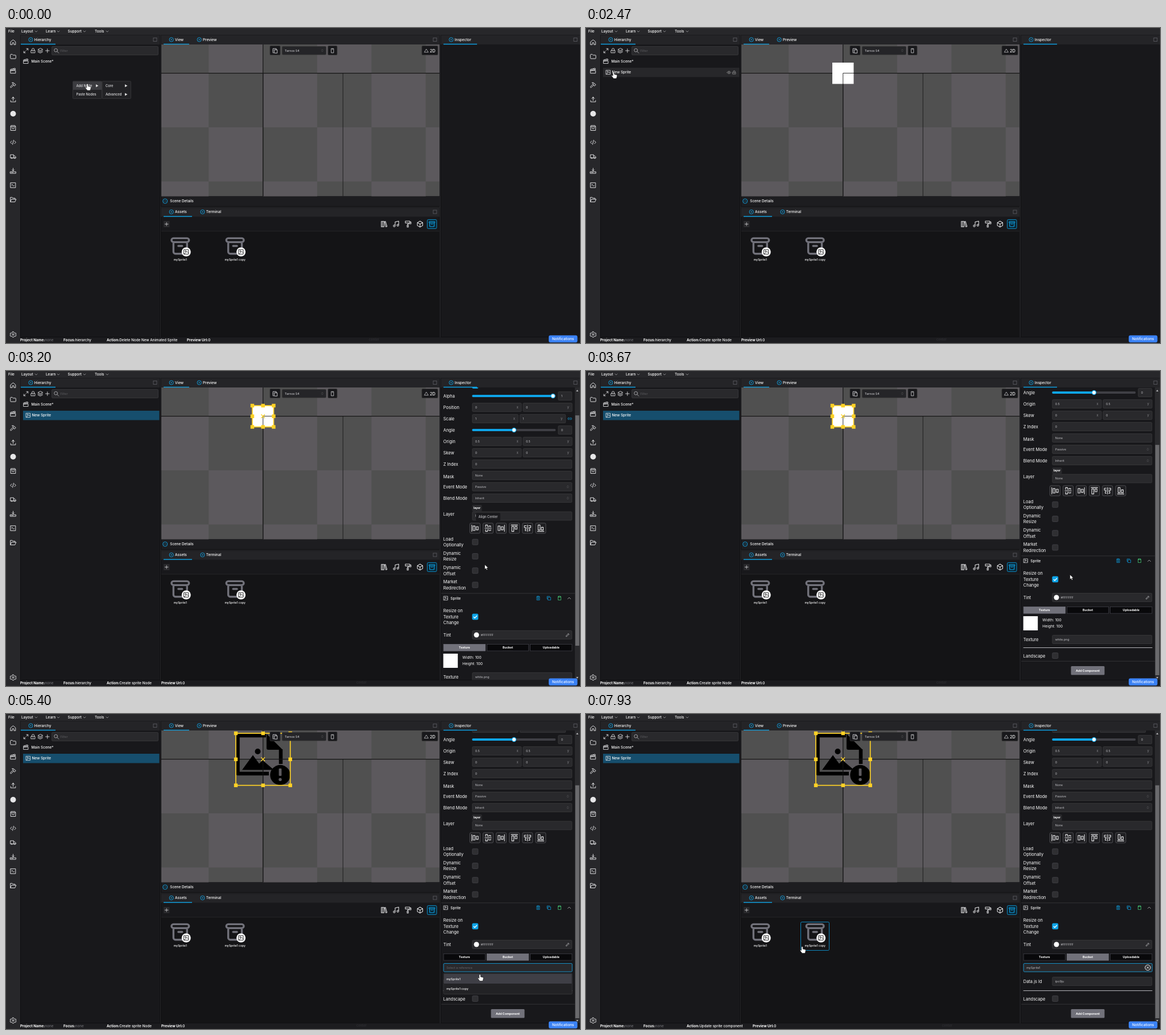
Recreate the animation shown at these times as an HTML page. Size 1009 by 555 pixels, loop 8 s.

```html
<!DOCTYPE html>
<html lang="en">
<head>
<meta charset="utf-8">
<title>Scene editor</title>
<style>
html, body { margin: 0; width: 100%; height: 100%; overflow: hidden; background: #27272a; }
svg { display: block; width: 1009px; height: 555px; }
text { font-family: Inter, "Open Sans", sans-serif; font-weight: 500; white-space: pre; }
.light { font-weight: 400; }
.bold { font-weight: 700; }
</style>
</head>
<body>
<svg id="stage" viewBox="0 0 1009 555" xmlns="http://www.w3.org/2000/svg"></svg>
<script>
const BLUE = '#0ea5e9', DIM = '#6b6b70', SOFT = '#c2c2c6', YELLOW = '#fdd126';
const PANEL = '#18181b', BAR = '#27272a', FIELD = '#29292c', EDGE = '#3a3a3d';

const ICONS = {
  home: 'M3 10.500 12 3l9 7.500V21h-6v-7H9v7H3z',
  folder: 'M2 6a2 2 0 0 1 2-2h5l3 3h8a2 2 0 0 1 2 2v9a2 2 0 0 1-2 2H4a2 2 0 0 1-2-2z',
  clap: 'M3 11h18v10H3zM3 11 2 7 19 2.500l1.500 4zM7 6l4 4M13 4.500l4 3.500',
  hammer: 'm14 12-8.500 8.500a2 2 0 0 1-3-3L11 9M17.500 15 22 10.500 13 3H8l5 5v2z',
  upload: 'M3 16v5h18v-5M7 9l5-6 5 6M12 3v13',
  bag: 'M5 3h14l2 4v14H3V7zM3 7h18M16 11a4 4 0 0 1-8 0',
  code: 'M7 7l-5 5 5 5M17 7l5 5-5 5M14 4l-4 16',
  truck: 'M5 17H2V5h12v12H9M14 9h4l4 4v4h-2M16 17h-2M9 17a2 2 0 1 1-4 0a2 2 0 1 1 4 0M20 17a2 2 0 1 1-4 0a2 2 0 1 1 4 0',
  tray: 'M12 2v10M8 8l4 4 4-4M2 15h20v6H2zM6 18h1M10 18h1',
  term: 'M3 3h18v18H3zM7 8l3 2.500-3 2.500M12 14h4',
  open: 'M2 20 6 11h17l-4 9zM2 20V4h7l2 3h8v4',
  gear: 'M15 12a3 3 0 1 1-6 0a3 3 0 1 1 6 0M10 2h4l1 3 3 2 3-1 2 4-2 2 2 3-2 4-3-1-3 2-1 2h-4l-1-2-3-2-3 1-2-4 2-3-2-2 2-4 3 1 3-2z',
  expand: 'M14 3h7v7M21 3l-7 7M10 21H3v-7M3 21l7-7',
  lock: 'M4 11h16v10H4zM7 11V7a5 5 0 0 1 10 0v4M12 15v2',
  layers: 'M12 2 2 7l10 5 10-5zM2 12l10 5 10-5M2 17l10 5 10-5',
  plus: 'M12 4v16M4 12h16',
  find: 'M17 10a7 7 0 1 1-14 0a7 7 0 1 1 14 0M15 15l7 7',
  picture: 'M3 3h18v18H3zM11 9a2 2 0 1 1-4 0a2 2 0 1 1 4 0M4 20 15 10l6 6',
  eye: 'M1 12q11-15 22 0q-11 15-22 0M15 12a3 3 0 1 1-6 0a3 3 0 1 1 6 0',
  rotate: 'M3 12V3h14v5M10 8h11v14H10zM3 12v9h3',
  phone: 'M7 2h10v20H7zM11 5h2',
  tri: 'M12 4 22 20H2z',
  books: 'M3 3h4v18H3zM7 3h5v18H7zM14 4l3-1 5 17-4 1z',
  music: 'M9 18V5l12-3v14M9 18a3 3 0 1 1-6 0a3 3 0 1 1 6 0M21 16a3 3 0 1 1-6 0a3 3 0 1 1 6 0',
  roller: 'M3 2h15v6H3zM18 5h4v6H11v4M9 15h4v7H9z',
  cube: 'M12 2 21 7v10l-9 5-9-5V7zM3 7l9 5 9-5M12 12v10',
  archive: 'M5 4h14a2 2 0 0 1 0 4H5a2 2 0 0 1 0-4M5 8v10a2 2 0 0 0 2 2h10a2 2 0 0 0 2-2V8M10 12h4',
  copy: 'M8 8h13v13H8zM4 16H3V3h13v1',
  paste: 'M8 4H5v17h14V4h-3M8 2h8v5H8z',
  list: 'M8 4H5v17h14V4h-3M8 2h8v5H8zM9 12h6M9 16h6',
  up: 'M4 16l8-8 8 8',
  down: 'M4 8l8 8 8-8',
  sort: 'M7 9l5-5 5 5M7 15l5 5 5-5',
  link: 'M9 7H7a5 5 0 0 0 0 10h2M15 7h2a5 5 0 0 1 0 10h-2M8 12h8',
  dropper: 'M3 21v-4L14 6l4 4L7 21zM15 3l6 6',
  cross: 'M7 7l10 10M17 7 7 17',
  alignLeft: 'M2 2v20M6 5h6v14H6zM16 7h6v10h-6z',
  alignCenter: 'M2 12h20M10 16v6H4v-6M10 8V2H4v6M20 16v3h-6v-3M20 8V5h-6v3',
  alignRight: 'M22 2v20M2 5h6v14H2zM12 7h6v10h-6z',
  alignTop: 'M2 2h20M4 6h6v16H4zM14 6h6v9h-6z',
  alignMiddle: 'M12 2v20M8 10H2V4h6M16 10h6V4h-6M8 20H5v-6h3M16 20h3v-6h-3',
  alignBottom: 'M2 22h20M4 2h6v16H4zM14 9h6v9h-6z'
};

const rect = (x, y, w, h, fill, more = '') =>
  `<rect x="${x}" y="${y}" width="${w}" height="${h}" fill="${fill}" ${more}/>`;
const line = (d, color, w = 1, more = '') =>
  `<path d="${d}" fill="none" stroke="${color}" stroke-width="${w}" ${more}/>`;
const circle = (x, y, r, fill, more = '') => `<circle cx="${x}" cy="${y}" r="${r}" fill="${fill}" ${more}/>`;
const text = (x, y, s, size = 6.4, fill = '#fff', more = '') =>
  `<text x="${x}" y="${y + size * .36}" font-size="${size}" fill="${fill}" ${more}>${s}</text>`;
const icon = (name, x, y, size = 11, color = '#e6e6e8', w = 2) =>
  line(ICONS[name], color, w, `stroke-linejoin="round" stroke-linecap="round" transform="translate(${x - size / 2} ${y - size / 2}) scale(${size / 24})"`);
const group = (id, body) => `<g id="${id}">${body}</g>`;
const MID = 'text-anchor="middle"', BOLD = ' class="bold"';
const box = (x, y, w, h, fill = FIELD, edge = EDGE, r = 1.5) =>
  rect(x + .5, y + .5, w - 1, h - 1, fill, `rx="${r}" stroke="${edge}" stroke-width=".8"`);

function tab(x, y, label, from, to) {
  const under = to ? rect(from, y + 7.3, to - from, 1.4, BLUE) : '';
  return circle(x, y, 3.6, 'none', `stroke="${BLUE}" stroke-width=".9"`) + circle(x, y, 1, BLUE) + text(x + 6.3, y, label) + under;
}
const maximize = (x, y) => rect(x - 3, y - 3, 6, 6, 'none', 'stroke="#5a5a5f" stroke-width=".9"');

function frameParts() {
  let s = rect(0, 0, 1009, 555, BAR);
  [['File', 4], ['Layout', 27, 53], ['Learn', 70, 92], ['Support', 108.5, 138], ['Tools', 156, 178]].forEach(([name, x, arrow]) => {
    s += text(x, 6, name) + (arrow ? icon('down', arrow, 6, 6) : '');
  });
  s += rect(0, 544.5, 1009, 10.5, '#1c1c1f') + rect(0, 535, 25, 20, BAR);
  const side = ['home', 'folder', 'clap', 'hammer', 'upload', '', 'bag', 'code', 'truck', 'tray', 'term', 'open'];
  side.forEach((name, i) => {
    const y = 25 + i * 25.2;
    s += name ? icon(name, 12.5, y, 11.5) : circle(12.5, y, 5, '#e6e6e8');
  });
  s += icon('gear', 12.5, 540, 11.5);
  [[25.5, 13, 245, 531.5], [272.5, 13, 489.5, 301.5], [272.5, 316.5, 489.5, 228], [764.5, 13, 244.5, 531.5]].forEach(([x, y, w, h]) => {
    s += rect(x, y, w, h, PANEL, 'stroke="#0f0f11" stroke-width="1"') + rect(x, y, w, 16, '#242427');
  });
  s += tab(43.5, 20.5, 'Hierarchy', 26, 87) + maximize(262, 20.5);
  s += tab(290.7, 20.5, 'View', 277, 322) + tab(339.7, 20.5, 'Preview') + maximize(754, 20.5);
  s += tab(782.5, 20.5, 'Inspector', 769, 828) + maximize(1001, 20.5);
  s += tab(290.7, 324, 'Assets', 277, 327) + tab(345.5, 324, 'Terminal') + maximize(754, 324);
  return s;
}

function hierarchy() {
  let s = '';
  ['expand', 'lock', 'layers', 'plus'].forEach((name, i) => s += icon(name, 35 + i * 12.6, 40, 10));
  s += box(80, 32, 188, 16) + icon('find', 88.5, 40, 10, '#b8b8bc') + text(95.5, 40, 'Filter', 5.4, '#57575b');
  s += icon('clap', 35, 58.5, 10.5) + text(44.5, 58.5, 'Main Scene*');
  s += group('rowHover', rect(30, 70, 239.5, 16.5, '#27272a') + icon('eye', 251.3, 78.3, 7.5, '#aaa') + icon('lock', 260.5, 78.3, 7.5, '#aaa'));
  s += group('rowPick', rect(30, 70, 239.5, 16.5, '#164e6d'));
  return s + group('node', icon('picture', 39, 78, 9.5) + text(45.5, 78, 'New Sprite'));
}

function handles(x, y, w, h) {
  let s = rect(x, y, w, h, 'none', `stroke="${YELLOW}" stroke-width="1.7"`);
  for (let i = 0; i < 9; i++) if (i !== 4) s += rect(x + (i % 3) * w / 2 - 3.2, y + Math.floor(i / 3) * h / 2 - 3.2, 6.4, 6.4, YELLOW);
  return s + line('M448.500 76.500l6.500 6.500M455 76.500l-6.500 6.500', YELLOW, 1.4);
}

function view() {
  const step = 95.4, hole = '#5c595d';
  let s = rect(273, 29, 489, 267.5, '#505050');
  for (let r = 0; r < 4; r++) for (let c = 0; c < 6; c++) {
    if ((r + c) % 2) s += rect(260.8 + c * step, 79.6 + (r - 1) * step, step, step, hole);
  }
  s += line('M273 79.600H762M451.800 29V297', '#161616', 1.2);
  s += group('white', rect(433, 61, 37.5, 37.5, '#fff'));
  s += group('broken', line('M462 105H407.500V38H457M483 62V88', '#000', 6.5, 'stroke-linejoin="round"')
    + '<path d="M458 35 486.300 63H461q-3 0-3-3zM415 98.500l19-26 11 15 6-6 20 17z"/>'
    + circle(442.5, 66, 5, '#000') + circle(482, 107.5, 17.7, '#000')
    + rect(479.6, 96, 4.8, 13, hole, 'rx="1"') + circle(482, 115.5, 2.7, hole));
  s += line('M451.800 297V79.600H592.300V297', '#1a1a1a', .9);
  s += group('pickSmall', handles(433, 61, 37.5, 37.5)) + group('pickBig', handles(404, 34, 95.7, 91.7));
  s = `<g clip-path="url(#viewClip)">${s}</g>`;
  s += box(463.5, 31, 19, 17, PANEL, '#333') + icon('rotate', 473, 40, 10);
  s += box(485, 32, 78, 15.5, '#252528', '#333') + text(490, 39.7, 'Tarnox S4', 5.3, SOFT) + icon('sort', 556, 39.7, 6, '#777');
  s += box(565.5, 31, 17, 17, PANEL, '#333') + icon('phone', 574, 40, 9);
  s += box(730.5, 31, 29, 17, PANEL, '#333') + icon('tri', 739, 40, 8) + text(745, 40, '2D', 7.3);
  s += rect(273, 297, 489, 17, '#1d1d20') + circle(279.7, 305, 4, 'none', `stroke="${BLUE}" stroke-width=".9"`) + icon('up', 279.7, 304.8, 5, BLUE, 3);
  return s + text(288.3, 305, 'Scene Details', 6.35);
}

const asset = (x, name) => icon('archive', x, 384, 41, '#71717a')
  + circle(x + 10.5, 394.5, 8, '#fff') + icon('picture', x + 10.5, 394.5, 10.5, '#18181b') + text(x, 408.3, name, 5, '#fff', MID);

function assets() {
  let s = rect(273, 358, 489, 186.5, '#141416') + line('M273 358H762', '#2a2a2d', .8);
  s += rect(277, 340, 10.5, 11, '#29292c') + icon('plus', 282.2, 345.5, 8.5);
  ['books', 'music', 'roller', 'cube'].forEach((name, i) => s += icon(name, 664.5 + i * 21.1, 345.5, 12.5));
  s += box(740, 337, 17.5, 17, '#0b2533', BLUE, 2) + icon('archive', 748.7, 345.5, 13.5, BLUE);
  s += group('assetHover', box(377, 366, 51, 51, 'none', BLUE, 2));
  return s + asset(306.3, 'mySprite1') + asset(402.6, 'mySprite1 copy');
}

const label = (y, ...rows) => rows.map((r, i) =>
  text(768.8, y + (i - (rows.length - 1) / 2) * 10.5, r, 7.45, '#fff', 'class="light"')).join('');
const field = (y, value, color = SOFT, x = 819.3, w = 176) => box(x, y - 8, w, 16) + text(x + 5.5, y, value, 5.3, color, 'class="light"');
const select = (y, value) => field(y, value) + icon('sort', 987.5, y, 6, '#77777b');
const check = (y, on) => on
  ? box(819.3, y - 5.5, 11, 11, BLUE, BLUE) + line(`M822 ${y}l2 2.300 4-4.300`, '#fff', 1.3)
  : box(819.3, y - 5.5, 11, 11, '#2f2f32', '#454549');
function pair(y, name, a, w = 87.2) {
  return label(y, name) + [0, 1].map(i => {
    const x = 819.3 + i * (w + 1.9);
    return field(y, a, SOFT, x, w) + text(x + w - 7.5, y, 'xy'[i], 5.8, '#77777b', MID);
  }).join('');
}
function slider(y, name, knob, value) {
  return label(y, name) + rect(819.3, y - 2, 147, 4, '#3f3f45', 'rx="2"') + rect(819.3, y - 2, knob - 819.3, 4, BLUE, 'rx="2"')
    + circle(knob, y, 3.6, '#fff', `stroke="${BLUE}" stroke-width="1.2"`) + field(y, value, SOFT, 970.3, 25);
}
function header(y, name, ic) {
  return line(`M765 ${y - 8.500}H1000`, EDGE, .8) + icon(ic, 773, y, 9) + text(781.3, y, name)
    + icon('list', 935.5, y, 8.5, BLUE) + icon('copy', 954.3, y, 8.5, BLUE) + icon('paste', 973, y, 8.5, '#4ade80') + icon('up', 990, y, 7.5);
}
const alignButtons = ['Left', 'Center', 'Right', 'Top', 'Middle', 'Bottom'].map((side, i) => {
  const x = 824.4 + i * 23.1;
  return box(x - 9.5, 208.5, 19, 19, '#1f1f22', '#5a5a5f', 2) + icon('align' + side, x, 218, 13.5);
}).join('');
const tabs = active => ['Texture', 'Bucket', 'Uploadable'].map((name, i) => {
  const x = 768.7 + i * 76.2, on = i === active;
  return box(x, 422, 74.3, 12.6, on ? '#71717a' : '#09090b', on ? '#71717a' : '#3f3f46', 0)
    + text(x + 37.2, 428.3, name, 5.3, '#fff', MID + BOLD);
}).join('');

function inspector() {
  let s = header(-72, 'Node', 'cube') + label(-54, 'Name') + field(-54, 'New Sprite') + label(-35, 'Visible') + check(-33.5, true);
  s += slider(-15, 'Alpha', 961.5, '1') + pair(5, 'Position', '0') + pair(25, 'Scale', '1', 81.5) + icon('link', 991, 25, 8, BLUE);
  s += slider(45, 'Angle', 893, '0') + pair(65, 'Origin', '0.5') + pair(85, 'Skew', '0') + label(105, 'Z Index') + field(105, '0');
  s += label(127, 'Mask') + field(125, 'None') + label(145, 'Event Mode') + select(145, 'Passive') + label(165, 'Blend Mode') + select(165, 'Inherit');
  s += label(193, 'Layer') + rect(819.5, 177, 17, 11.5, '#29292c', 'rx="1.5"') + text(828, 182.3, 'layer', 5.1, '#fff', MID + BOLD) + field(196.5, 'None');
  s += alignButtons;
  s += group('tip', rect(826, 191, 43, 14, '#1a1a1d', 'rx="2"') + text(847.5, 198.3, 'Align Center', 5.75, SOFT, MID));
  ['Load Optionally', 'Dynamic Resize', 'Dynamic Offset', 'Market Redirection'].forEach((name, i) => {
    const y = 242.3 + i * 25.2;
    s += label(y, ...name.split(' ')) + check(y, false);
  });
  s += header(341.3, 'Sprite', 'picture') + label(374.3, 'Resize on', 'Texture', 'Change') + check(374, true);
  s += label(406, 'Tint') + box(819.3, 398, 176, 16) + circle(827, 406, 4.5, '#fff') + text(834.5, 406, '#FFFFFF', 5.4, SOFT, 'class="light"') + icon('dropper', 987.3, 406, 7);
  s += group('texture', tabs(0) + rect(768.7, 439, 25.5, 25, '#fff') + text(802.3, 445.7, 'Width: 100', 6.7, '#fff', 'class="light"')
    + text(802.3, 456.5, 'Height: 100', 6.7, '#fff', 'class="light"') + label(480.5, 'Texture') + field(480, 'white.png'));
  s += group('bucket', tabs(1) + box(768.7, 439, 227, 15.6) + text(774.2, 446.8, 'Select a reference', 5.3, '#66666b', 'id="ref" class="light"')
    + group('focusRing', box(768.7, 439, 227, 15.6, 'none', BLUE))
    + group('clear', circle(987.5, 446.8, 4.7, 'none', 'stroke="#fff" stroke-width="1"') + icon('cross', 987.5, 446.8, 8, '#fff', 3))
    + label(471.3, 'Data.js Id') + field(471, 'ipo9ju'));
  s += group('tail', line('M768.700 487.500H995.500', '#c9c9cc', .9) + label(502, 'Landscape') + check(501.5, false)
    + line('M765 511.300H1000', EDGE, .8) + rect(852.5, 520, 59, 15.5, '#71717a', 'rx="1.5"') + text(882, 527.8, 'Add Component', 5.3, '#fff', MID + BOLD));
  s += group('drop', box(768.7, 456.5, 227, 37.5, '#222225', EDGE) + rect(770, 458, 224.4, 17, '#3f3f46', 'id="dropRow"')
    + text(774.2, 467, 'mySprite1', 5.3) + text(774.2, 484, 'mySprite1 copy', 5.3));
  const bar = rect(1000, 29, 9, 515.5, '#2a2a2d') + rect(1000.7, 0, 7, 10, '#6a6a6d', 'id="thumb"')
    + '<path d="M1002.200 36l2-3 2 3zM1002.200 539l2 3 2-3z" fill="#b5b5b8"/>';
  return group('inspector', `<g clip-path="url(#inspClip)">${group('scroller', s)}</g>` + bar);
}

function menu(x, w, items, hot, arrows) {
  return box(x, 93.3, w, items.length * 15.2 + 1.2, '#222225', EDGE, 1) + items.map((name, i) => {
    const y = 101.7 + i * 15.2;
    return rect(x + 1, y - 7.4, w - 2, 14.6, '#3c3c40', `class="hot" ${i === hot ? '' : 'visibility="hidden"'}`) + text(x + 6.5, y, name, 5.85, '#e2e2e4')
      + (arrows > i ? `<path d="M${x + w - 11} ${y - 2.500}l4.500 2.500-4.500 2.500z" fill="#ddd"/>` : '');
  }).join('');
}
const menus = () => group('menus', menu(117, 52, ['Add Node', 'Paste Nodes'], 0, 1)
  + group('subMenu', menu(168.5, 51.5, ['Core', 'Advanced'], -1, 2))
  + group('coreMenu', menu(219.5, 70.5, ['Container', 'Sprite', 'Animated Sprite', 'Text', 'Graphics'], -1, 0)));

function status() {
  const part = (x, name, value, id, color) => `<text id="${id}" x="${x}" y="551.700" font-size="6.300" fill="#fff"><tspan${BOLD}>${name}:</tspan><tspan class="v" fill="${color}">${value}</tspan></text>`;
  return part(25, 'Project Name', 'none', 'project', DIM) + part(101, 'Focus', 'hierarchy', 'focus', '#fff')
    + part(177, 'Action', '', 'action', '#fff') + part(318, 'Preview Url', '0', 'url', '#fff') + text(638, 549.3, 'center', 5.8, '#303034', 'id="faint"')
    + rect(954, 541.5, 50.5, 12.5, '#3b82f6', 'rx="3"') + text(979.2, 547.5, 'Notifications', 6.35, '#fff', MID);
}

const cursors = group('cursor',
  '<path id="hand" d="M-1.300 1a1.300 1.300 0 0 1 2.600 0v3l4 .9q1 .3 1 1.400l-.6 3-.8 2.200h-5l-3.400-4.400q-.4-1.500 1-1.300l1.200 1z" fill="#fff" stroke="#111" stroke-width=".6"/>'
  + '<path id="arrow" d="M0 0v8.500l2-1.800 1.400 3 1.500-.7-1.300-2.900h2.700z" fill="#fff" stroke="#000" stroke-width=".6"/>'
  + '<path id="beam" d="M-2-4H2M-2 4H2M0-4V4" fill="none" stroke="#e8e8ea" stroke-width="1"/>');

const stage = document.getElementById('stage');
stage.innerHTML = '<defs><clipPath id="viewClip"><path d="M273 29H762V296.500H273z"/></clipPath><clipPath id="inspClip"><path d="M765 29H1000V544.500H765z"/></clipPath></defs>'
  + frameParts() + hierarchy() + view() + assets() + inspector() + status() + menus() + cursors;

const $ = id => document.getElementById(id);
const show = (id, on) => $(id).setAttribute('display', on ? 'inline' : 'none');
const set = (id, name, value) => $(id).setAttribute(name, value);
const put = (id, value) => { $(id).querySelector('.v').textContent = value; };
const coreHot = $('subMenu').querySelectorAll('.hot'), leafHot = $('coreMenu').querySelectorAll('.hot');

// time, x, y, pointer shape from that time on
const PATH = [
  [0, 143, 98.5, 'hand'], [330, 188, 101, 'hand'], [530, 215, 103, 'hand'], [870, 252, 118, 'hand'], [933, 257.5, 124, 'hand'],
  [1200, 257.5, 124, 'arrow'], [1270, 257.5, 124, 'arrow'], [2000, 120, 108, 'arrow'], [2133, 68, 83, 'hand'], [2267, 48.5, 77.5, 'hand'],
  [2530, 48.5, 77.5, 'hand'], [2600, 90, 92, 'arrow'], [3067, 841.5, 338, 'arrow'], [3133, 841.5, 341, 'arrow'], [3530, 841.5, 341, 'arrow'],
  [4133, 882, 419, 'arrow'], [4667, 882, 419, 'arrow'], [4867, 846, 442, 'beam'], [5000, 835, 448, 'beam'], [5200, 835, 448, 'beam'],
  [5400, 833, 459, 'hand'], [5800, 830.5, 471, 'hand'], [6260, 830.5, 471, 'beam'], [6533, 830.5, 471, 'beam'], [6733, 850.5, 464, 'beam'],
  [6800, 850.5, 464, 'beam'], [7133, 863, 467, 'beam'], [7533, 863, 467, 'beam'], [7600, 820, 460, 'arrow'], [7860, 425, 413, 'hand'], [7933, 380, 410, 'hand'], [8000, 380, 410, 'hand']];
const SCROLL = [[3067, 0], [3200.5, 51], [3400, 117], [4265, 117], [4266, 110]];

function along(keys, t) {
  const i = keys.findIndex(k => k[0] > t);
  if (i === 0) return keys[0].slice(1);
  if (i < 0) return keys[keys.length - 1].slice(1);
  const a = keys[i - 1], b = keys[i], u = (t - a[0]) / (b[0] - a[0]);
  return a.slice(1).map((v, k) => typeof v === 'number' ? v + (b[k + 1] - v) * u : v);
}

function draw(time) {
  const t = Math.floor((time + 3.4) * .015) / .015 + .5;
  const [x, y, shape] = along(PATH, t), [scroll] = along(SCROLL, t);
  const made = t > 1199, picked = t > 2530, bucket = t > 4265, open = t > 5060 && t < 6260, chosen = t > 6260, updated = t > 5860;

  set('cursor', 'transform', `translate(${x} ${y})`);
  ['hand', 'arrow', 'beam'].forEach(name => show(name, name === shape));

  show('menus', !made);
  show('coreMenu', x > 175);
  coreHot[0].setAttribute('visibility', x > 169 ? 'visible' : 'hidden');
  leafHot.forEach((el, i) => el.setAttribute('visibility', x > 220 && i === Math.floor((y - 94.1) / 15.2) ? 'visible' : 'hidden'));

  show('node', made);
  show('rowHover', made && !picked && x < 269 && y > 70 && y < 86.5);
  show('rowPick', picked);
  show('white', made && !bucket);
  show('broken', bucket);
  show('pickSmall', picked && !bucket);
  show('pickBig', bucket);

  show('inspector', picked);
  set('scroller', 'transform', `translate(0 ${110 - scroll})`);
  const ratio = 498 / (bucket ? 625 : 632);
  set('thumb', 'y', 38 + scroll * ratio);
  set('thumb', 'height', 515 * ratio);
  show('tip', t > 3060 && t < 3265);
  show('texture', !bucket);
  show('bucket', bucket);
  set('tail', 'transform', `translate(0 ${bucket ? 0 : 7})`);
  show('drop', open);
  show('dropRow', y > 457);
  show('focusRing', t > 5060);
  show('clear', chosen);
  $('ref').textContent = chosen ? 'mySprite1' : 'Select a reference';
  set('ref', 'fill', chosen ? SOFT : '#66666b');
  show('assetHover', t > 7500 && x > 377 && x < 428 && y < 417);

  const focused = t < 660 || (t > 1400 && !bucket);
  put('focus', focused ? 'hierarchy' : 'none');
  $('focus').querySelector('.v').setAttribute('fill', focused ? '#fff' : DIM);
  put('action', updated ? 'Update sprite component' : made ? 'Create sprite Node' : 'Delete Node New Animated Sprite');
  set('url', 'x', updated ? 293 : made ? 273 : 318);
  set('faint', 'x', updated ? 626 : made ? 616 : 638);
}

function tick() {
  draw(performance.now() % 8000);
  requestAnimationFrame(tick);
}
tick();
</script>
</body>
</html>
```
